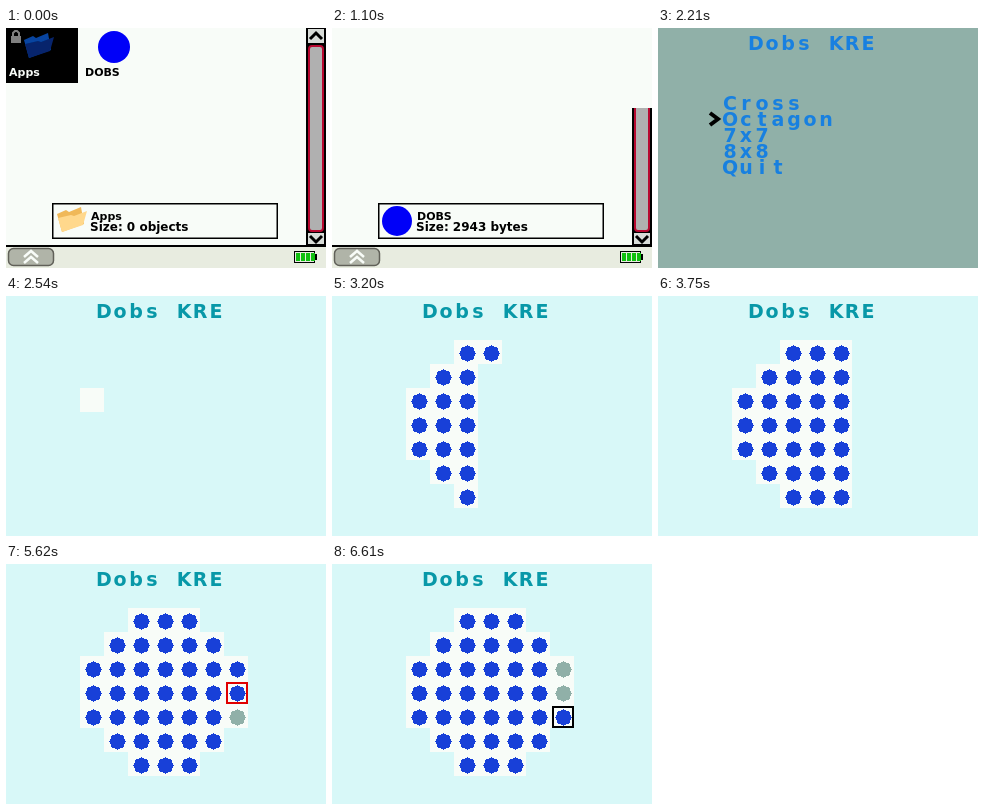
Recreate the animation shown at these times as an HTML page with a canvas. Size 320 px wide and 240 px high, loop 6940 ms.

```html
<!DOCTYPE html>
<html lang="en">
<head>
<meta charset="utf-8">
<title>Peg board</title>
<style>
html, body { margin: 0; overflow: hidden; }
canvas { display: block; }
</style>
</head>
<body>
<canvas id="stage" width="320" height="240"></canvas>
<script>
const ctx = document.getElementById('stage').getContext('2d');
const LOOP = 6940, TICK = 110;
const WHITE = '#f8fcf8', BLACK = '#000', BLUE = '#1840d8', GREY = '#90b0a8';
const TITLE = 'Dobs KRE', LABEL = 'DOBS';

function rect(color, x, y, w, h) {
  ctx.fillStyle = color;
  ctx.fillRect(x, y, w, h);
}

function frame(color, x, y, w, h, line) {
  ctx.strokeStyle = color;
  ctx.lineWidth = line;
  ctx.strokeRect(x + line / 2, y + line / 2, w - line, h - line);
}

function polygon(color, points) {
  ctx.fillStyle = color;
  ctx.beginPath();
  points.forEach(([x, y]) => ctx.lineTo(x, y));
  ctx.fill();
}

function polyline(color, line, points) {
  ctx.strokeStyle = color;
  ctx.lineWidth = line;
  ctx.beginPath();
  points.forEach(([x, y]) => ctx.lineTo(x, y));
  ctx.stroke();
}

function rounded(x, y, w, h, r, fill, stroke, line) {
  ctx.beginPath();
  ctx.roundRect(x, y, w, h, r);
  ctx.fillStyle = fill;
  ctx.fill();
  ctx.strokeStyle = stroke;
  ctx.lineWidth = line;
  ctx.stroke();
}

// Tip at x, y; a negative h points down
function chevron(color, x, y, w, h, line) {
  polyline(color, line, [[x - w, y + h], [x, y], [x + w, y + h]]);
}

function text(str, x, y, size, color = BLACK, family = '"DejaVu Sans", sans-serif') {
  ctx.font = `bold ${size}px ${family}`;
  ctx.textAlign = 'left';
  ctx.fillStyle = color;
  ctx.fillText(str, x, y);
}

// Wide lettering on a 16 px character grid
function gridText(str, x, y, color) {
  ctx.font = 'bold 19px "DejaVu Sans", sans-serif';
  ctx.textAlign = 'center';
  ctx.fillStyle = color;
  [...str].forEach((ch, i) => ctx.fillText(ch, x + 7 + 16 * i, y));
}

// ---- Program launcher ----

function folder(x, y) {
  polygon('#f0b858', [[x, y + 7], [x + 9, y + 3], [x + 12, y + 5], [x + 24, y], [x + 27, y + 17], [x + 5, y + 25]]);
  polygon('#ffd88c', [[x + 1, y + 11], [x + 14, y + 8], [x + 17, y + 9], [x + 30, y + 4], [x + 26, y + 18], [x + 5, y + 25]]);
}

function disc(x, y, r) {
  ctx.fillStyle = '#0000f8';
  ctx.beginPath();
  ctx.arc(x, y, r, 0, 7);
  ctx.fill();
}

function lock() {
  polyline('#808080', 2, [[7, 9], [7, 5], [9, 3], [11, 3], [13, 5], [13, 9]]);
  rect('#808080', 5, 8, 10, 7);
}

function scrollBar() {
  rect(BLACK, 300, 0, 20, 218);
  rect('#d8dcd8', 302, 1, 16, 14);
  rect('#d8dcd8', 302, 205, 16, 11);
  chevron(BLACK, 310, 5, 6, 6, 3);
  chevron(BLACK, 310, 214, 6, -6, 3);
  rounded(303, 18, 14, 185, 3, '#b0b0b0', '#b80830', 2);
}

function statusBar() {
  rect('#e8ece0', 0, 218, 320, 22);
  rect(BLACK, 0, 217, 320, 2);
  rounded(2.5, 220.5, 45, 17, 5, '#b0b4a8', '#606058', 1.5);
  chevron(WHITE, 25, 223, 7, 6, 2.5);
  chevron(WHITE, 25, 229, 7, 6, 2.5);
  frame(BLACK, 288, 223, 21, 12, 1);
  rect(BLACK, 309, 226, 2, 6);
  for (let i = 0; i < 4; i++) rect('#10c010', 290 + 5 * i, 225, 4, 8);
}

function launcher(selected, showInfo) {
  rect(WHITE, 0, 0, 320, 240);
  folder(18, 5);
  text('Apps', 3, 48, 11);
  disc(108, 19, 16);
  text(LABEL, 79, 48, 11);
  ctx.globalCompositeOperation = 'difference';
  rect(WHITE, selected * 76, 0, 72, 55);
  ctx.globalCompositeOperation = 'source-over';
  lock();

  frame(BLACK, 46, 175, 226, 36, 1.5);
  if (showInfo) {
    if (selected) disc(65, 193, 15);
    else folder(51, 179);
    text(selected ? LABEL : 'Apps', 85, 192, 11);
    text(selected ? 'Size: 2943 bytes' : 'Size: 0 objects', 84, 203, 12);
  }
  scrollBar();
  statusBar();
}

// ---- Home screen and menu ----

function homeScreen(showStatus) {
  rect(WHITE, 0, 0, 320, 240);
  rect('#505450', 0, 0, 320, 30);
  if (!showStatus) return;
  ctx.letterSpacing = '0.35px';
  text('NORMAL FLOAT AUTO REAL RADIAN MP', 1, 12, 13, WHITE, '"DejaVu Sans Mono", monospace');
  ctx.letterSpacing = '0px';
  frame('#c0c4c0', 303, 4, 14, 20, 2);
  rect('#c0c4c0', 307, 2, 6, 3);
}

function menu(t) {
  const color = '#1880e0';
  const items = ['Cross', 'Octagon', '7x7', '8x8', 'Quit'];
  rect(GREY, 0, 0, 320, 240);
  if (t >= 1880) gridText(TITLE, 91, 22, color);
  const count = t >= 2100 ? 5 : t >= 1990 ? 3 : 0;
  items.slice(0, count).forEach((item, i) => gridText(item, 65, 82 + 16 * i, color));
  if (t >= 2100) {
    const y = t >= 2210 ? 91 : 75;
    polyline(BLACK, 4, [[52, y - 6], [60, y], [52, y + 6]]);
  }
}

// ---- Board ----

const cells = [];
[1, 2, 3, 3, 3, 2, 1].forEach((reach, col) => {
  for (let row = 3 - reach; row <= 3 + reach; row++) cells.push([col, row]);
});

// [start time, column, row, colour]; no column means hidden
const cursorSteps = [
  [4300, 3, 3, BLACK], [4410, 4, 3, BLACK], [4740, 5, 3, BLACK], [4850],
  [5180, 6, 2, BLACK], [5400, 6, 2, '#e00000'], [5620, 6, 3, '#e00000'],
  [6170, 6, 4, '#e00000'], [6610, 6, 4, BLACK]
];

function peg(col, row, color) {
  const x = 87 + 24 * col, y = 57 + 24 * row;
  for (const [a, b] of [[8, 0], [7, 2], [6, 5]]) {
    rect(color, x - a, y - b, 2 * a + 1, 2 * b + 1);
    rect(color, x - b, y - a, 2 * b + 1, 2 * a + 1);
  }
}

function isHole(col, row, t) {
  if (col !== 6) return false;
  return row === 2 ? t >= 6280 : row === 3 ? t >= 6390 : t < 6500;
}

function board(t) {
  rect('#d8f8f8', 0, 0, 320, 240);
  gridText(TITLE, 91, 22, '#0898a8');
  if (t < 2540) return;
  // Each cell takes two steps: square, then peg
  const steps = 1 + Math.floor(Math.floor((t - 2540) / TICK) * 57 / 11);
  cells.forEach(([col, row], i) => {
    if (steps > 2 * i) rect(WHITE, 74 + 24 * col, 44 + 24 * row, 24, 24);
    if (steps > 2 * i + 1) peg(col, row, isHole(col, row, t) ? GREY : BLUE);
  });
  const step = cursorSteps.findLast(([start]) => t >= start);
  if (step && step.length > 1) {
    const [, col, row, color] = step;
    frame(color, 76 + 24 * col, 46 + 24 * row, 22, 22, 2);
  }
}

function draw(t) {
  if (t < 1550) {
    launcher(t < 220 ? 0 : 1, t < 220 || t >= 330);
    if (t >= 1100) rect(WHITE, 0, 0, 320, t < 1210 ? 80 : t < 1320 ? 160 : 238);
  } else if (t < 1770) homeScreen(t >= 1660);
  else if (t < 2430) menu(t);
  else board(t);
}

function tick() {
  draw(Math.round(performance.now()) % LOOP);
  requestAnimationFrame(tick);
}
tick();
</script>
</body>
</html>
```
